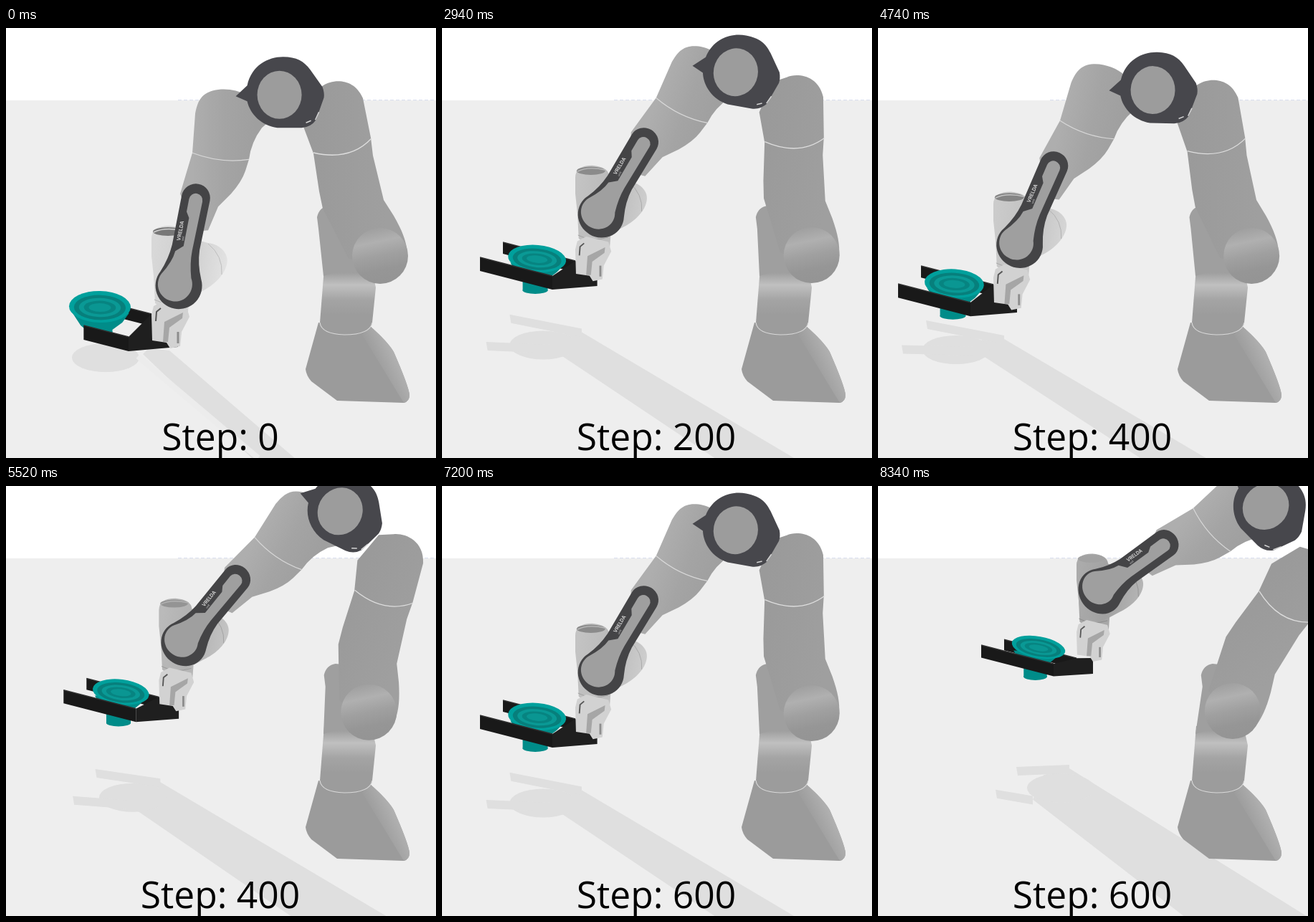
Recreate the animation shown at these times as an HTML page with a canvas. Size 600x600 px, loop 8.4 s.

```html
<!DOCTYPE html>
<html lang="en">
<head>
<meta charset="utf-8">
<title>Gripper steps</title>
<style>
html, body { margin: 0; width: 100%; height: 100%; overflow: hidden; background: #fff; }
canvas { display: block; width: 600px; height: 600px; }
</style>
</head>
<body>
<canvas id="stage" width="600" height="600"></canvas>
<script>
const ctx = document.getElementById("stage").getContext("2d");
const LOOP = 8400, TICK = 60;
const STARTS = [0, 33, 69, 104];   // first tick of each run

// Where the wrist passes: tick, x, y
const WRIST_PATH = [[0, 203, 288], [2, 194, 278], [10, 161, 240], [16, 186, 203], [29, 239, 138], [35, 277, 105]];

const add = (p, x, y) => [p[0] + x, p[1] + y];
const rad = deg => deg * Math.PI / 180;
const gray = v => `rgb(${v},${v},${v})`;
const smooth = u => {
  u = Math.max(0, Math.min(1, u));
  return u * u * (3 - 2 * u);
};

// Cubic curve through the key points, starting from rest.
function along(path, t) {
  const last = path.length - 1;
  let i = 0;
  while (i < last - 1 && t > path[i + 1][0]) i++;
  const slope = (k, c) => {
    if (k === 0) return 0;
    const a = path[k - 1], b = path[Math.min(k + 1, last)];
    return (b[c] - a[c]) / (b[0] - a[0]);
  };
  const a = path[i], b = path[i + 1], h = b[0] - a[0];
  const u = Math.min((t - a[0]) / h, 1), w = 1 - u;
  return [1, 2].map(c => w * w * (1 + 2 * u) * a[c] + u * u * (3 - 2 * u) * b[c] +
    h * u * w * (w * slope(i, c) - u * slope(i + 1, c)));
}

// Joint positions and angles at tick t of a run.
function poseAt(t, reach) {
  const wrist = along(WRIST_PATH, t);
  const swing = 45.5 * smooth((t - 7) / 29);
  const hip = [522 - swing * 0.6, 318 - swing * 0.09];
  const lean = rad(swing / 1.1 - 32), arm = 265 + 24 * Math.sqrt(swing / 46);
  const disc = add(wrist, 38 - t * 0.15, 72 - t * 0.85);
  const tilt = 11 + 1.22 * t, length = 126 - t * 0.35;
  const frontR = add(wrist, -32, 143);
  const frontL = add(frontR, -101 * reach, -26 * reach);
  const bowl = add(wrist, -53 - 19 * Math.exp(-t / 4), 120 - 19 * Math.exp(-t / 6));
  return {
    t, wrist, swing, hip, disc, tilt, length, frontL, frontR, bowl,
    size: 1 - 0.0034 * t,
    elbow: add(hip, Math.sin(lean) * arm, -Math.cos(lean) * arm),
    tip: add(disc, Math.sin(rad(tilt)) * length, -Math.cos(rad(tilt)) * length),
    back: [32, t * 0.69 - 32],
    stem: add(bowl, -1 - t * 0.1, 52 - t * 0.17 - 12 * Math.exp(-t))
  };
}

function poly(points, color) {
  ctx.beginPath();
  points.forEach(p => ctx.lineTo(...p));
  ctx.closePath();
  ctx.fillStyle = color;
  ctx.fill();
}

function oval(x, y, rx, ry, color, tilt = 0) {
  ctx.beginPath();
  ctx.ellipse(x, y, rx, ry, tilt, 0, 7);
  ctx.fillStyle = color;
  ctx.fill();
}

function shape(d, color) {
  ctx.fillStyle = color;
  ctx.fill(new Path2D(d));
}

function line(d, color, width = 1) {
  ctx.strokeStyle = color;
  ctx.lineWidth = width;
  ctx.stroke(new Path2D(d));
}

function ramp(x0, y0, x1, y1, ...stops) {
  const g = ctx.createLinearGradient(x0, y0, x1, y1);
  stops.forEach((c, i) => g.addColorStop(i / (stops.length - 1), c));
  return g;
}

// Draws a part turned about a joint; (x, y) is that joint at rest.
function part(joint, deg, x, y, draw, sx = 1, sy = sx) {
  ctx.save();
  ctx.translate(...joint);
  ctx.rotate(rad(deg));
  ctx.scale(sx, sy);
  ctx.translate(-x, -y);
  draw();
  ctx.restore();
}

function floor() {
  ctx.fillStyle = "#fff";
  ctx.fillRect(0, 0, 600, 600);
  ctx.fillStyle = "#eee";
  ctx.fillRect(0, 101, 600, 499);
  ctx.setLineDash([5, 3]);
  line("M240 100.5H600", "#d9deee");
  ctx.setLineDash([]);
}

function shadows({ t, wrist }, first) {
  const tone = "#dfdfdf", x = wrist[0];
  const low = [x - 12 - t * 1.4, 455 - t * 0.5];
  const high = [x + 25 - t, 450 - t * 1.6];
  poly([low, [x - 4 - t * 1.2, 447 - t * 1.25], high, [405 + t * 5.6, 602], [345 + t * 2.4, 602]], tone);
  oval(x - 64 + t * 1.2, 460 - t * 1.1, 47, 20, tone);
  if (first) {
    line("M184 458L352 600", "#ececec", 8);
    return;
  }
  const front = [x - 134 + t * 0.6, 450 - t * 0.75];
  const back = [x - 98 + t * 0.4, 391 + 52 * Math.exp(-t / 9)];
  for (const [from, to] of [[front, low], [back, high]])
    poly([from, add(to, 0, -5), add(to, 0, 7), add(from, 2, 12)], tone);
}

function base(p) {
  shape("M436 411L418 476Q419 485 426 493L462 520L555 523Q563 521 563 512Q562 500 541 452Q533 438 508 416Z",
    "#9b9b9b");
  shape("M497 428L508 416Q533 438 541 452Q562 500 563 512Q563 521 555 523Z",
    ramp(515, 470, 552, 452, "#9b9b9b", "#b8b8b8"));
  shape("M444 335L438 411Q440 427 472 428Q508 428 511 411L516 362L510 335Z",
    ramp(0, 338, 0, 400, "#989898", "#c0c0c0", "#a4a4a4", "#9c9c9c"));
  line("M438 411Q440 427 472 428Q508 428 511 411", "#d8d8d8", 1.2);
  const x = 434 + p.swing * 0.37;
  shape(`M443 346L${x + 2} 280L${x} 264Q${x + 3} 250 ${x + 16} 248L${x + 35} 250L505 342L460 341Z`, "#9f9f9f");
}

function upperArm(p) {
  part(p.hip, p.swing, 522, 318, () => {
    shape("M425 90L443 80C455 72 485 68 498 98L509 153L512 178L527 240L541 262C553 283 558 296 560 312" +
      "L522 330L478 322L442 252L437 228L429 175L414 135Z", ramp(425, 0, 530, 0, "#9a9a9a", "#9f9f9f"));
    line("M429 174Q480 186 510 154", "#dedede", 1.3);
  });
  const [x, y] = p.hip;
  oval(x, y, 39, 39, ramp(x - 8, y - 39, x + 8, y + 38, "#9f9f9f", "#b0b0b0", "#a0a0a0", "#969696", "#949494"));
}

function forearm(p) {
  part(p.tip, p.tilt - 11, 266, 237, () => {
    shape("M381 93L345 75L335 94C325 87 305 84 290 88C272 93 268 105 265 120L261 175L252 205L244 232" +
      "L262 285L283 283L297 250L315 232Q330 215 335 200L340 184Q343 160 358 140L381 120Z",
      ramp(262, 0, 350, 0, "#aeaeae", "#a4a4a4", "#9f9f9f"));
    line("M261 175Q300 190 340 184", "#d8d8d8", 1.2);
  });
}

function elbow(p) {
  part(p.elbow, p.swing, 381, 93, () => {
    shape("M320 95L336 80C342 52 365 40 386 40C405 40 415 46 424 58L441 82Q444 90 443 97L432 128" +
      "Q425 138 412 139L378 139C356 136 340 120 336 102Z", "#47474c");
    oval(381, 93, 31, 33.5, "#9c9c9c");
    line("M418 132L425 129M431 128L436 117", "#d5d5d5", 1.5);
  });
}

function bowl({ t, bowl: [x, y], stem: [sx, sy] }) {
  const rx = 43 - t * 0.15, ry = 22 - t * 0.2, tilt = 0.02 + t * 0.0045;
  const w = rx * 0.43, dark = "#008c89";
  poly([[x - rx * 0.92, y + ry * 0.3], [sx - rx * 0.6, y + ry + 4], [sx - w, y + ry + 10], [sx - w, sy - 4],
    [sx + w, sy - 4], [sx + w, y + ry + 10], [sx + rx * 0.75, y + ry], [x + rx * 0.95, y + ry * 0.4]], dark);
  oval(sx, sy - 5, w, 5, dark);
  ["#00a09c", "#077f7c", "#0a9995", "#078481", "#0a9692"].forEach((color, i) => {
    const k = 1 - i * 0.16;
    oval(x, y + (i ? 1 : 0), rx * k, ry * k * (1 - i * 0.06), color, tilt);
  });
}

function bar(from, to, h) {
  poly([from, to, add(to, 0, h), add(from, 0, h)], "#191919");
  line(`M${from}L${to}`, "#303030", 1.5);
}

function gripper(p) {
  const { frontL, frontR, back, wrist, t } = p, h = 20 * p.size;
  const backR = add(frontR, ...back), mount = add(wrist, 37 - t * 0.4, 157);
  bar(add(frontL, ...back), backR, h * 0.85);
  bowl(p);
  poly([frontR, backR, add(mount, 0, -22), mount, add(frontR, 0, h)], "#1f1f1f");
  bar(frontL, frontR, h);
}

// The wrist turns away from the light as it rises.
function wrist({ wrist, size, t }) {
  const dim = k => gray(Math.round(k - t * 1.3));
  part(wrist, 0, 203, 288, () => {
    shape("M206 340L208 384L222 394L254 396L258 340Z", dim(212));
    shape("M203 294Q203 276 228 276Q252 278 253 292L282 300C300 302 312 316 308 330C304 348 285 362 272 368" +
      "L240 385L209 374L203 318Z", ramp(203, 330, 305, 345, dim(216), dim(206), dim(226)));
    line("M282 301Q303 318 301 344", dim(190));
    oval(226, 284, 21, 6, gray(Math.round(120 + t * 1.2)));
    line("M206 285Q222 277 248 283", dim(208), 1.5);
    line("M207 379Q228 390 252 382", dim(180));
    shape("M203 400L206 388L219 381L252 389L256 403L245 424L243 444L229 447L224 439L204 436Z", "#d2d2d2");
    shape("M221 410L247 397L246 405L228 418L226 438L219 438Z", "#a6a6a6");
    line("M209 409L210 396L216 391", "#555", 2);
    line("M240 424L240 440", "#8d8d8d", 3);
  }, size);
}

function panel(p) {
  part(p.disc, p.tilt, 0, 0, () => {
    shape("M-20 -125A20 20 0 0 1 20 -125L19 -55Q20 -35 29 -15A32.5 32.5 0 1 1 -29 -15Q-21 -35 -20 -55Z",
      "#444446");
    shape("M-9 -122A9.5 9.5 0 0 1 10 -122L9 -52Q9 -34 15 -14A24 24 0 1 1 -27 -12Q-15 -32 -14 -47" +
      "L-4 -56L-4 -96L-9 -104Z", "#9f9f9f");
    ctx.rotate(-Math.PI / 2);
    ctx.textAlign = "center";
    ctx.fillStyle = "#d0d0d0";
    ctx.font = "bold 7px Inter, sans-serif";
    ctx.fillText("VRELDA", 76, -10);
    ctx.font = "4px Inter, sans-serif";
    ctx.fillText("unit", 66, -5.5);
  }, 1, p.length / 126);
}

function caption(step) {
  ctx.font = "51.5px 'Open Sans', 'Noto Sans', sans-serif";
  ctx.textAlign = "center";
  ctx.fillStyle = "#000";
  ctx.fillText("Step: " + step, 299, 589);
}

function draw(now) {
  const tick = Math.floor(now % LOOP / TICK);
  const run = STARTS.filter(s => s <= tick).length - 1;
  const first = run === 0;
  // Short fingers cannot lift, so the first run barely moves.
  const p = first ? poseAt(tick / 80, 0.62) : poseAt(tick - STARTS[run], 1);

  floor();
  shadows(p, first);
  base(p);
  upperArm(p);
  forearm(p);
  elbow(p);
  gripper(p);
  wrist(p);
  panel(p);
  caption(run * 200);
}

const begin = performance.now();
function loop() {
  draw(performance.now() - begin);
  requestAnimationFrame(loop);
}
loop();
</script>
</body>
</html>
```
